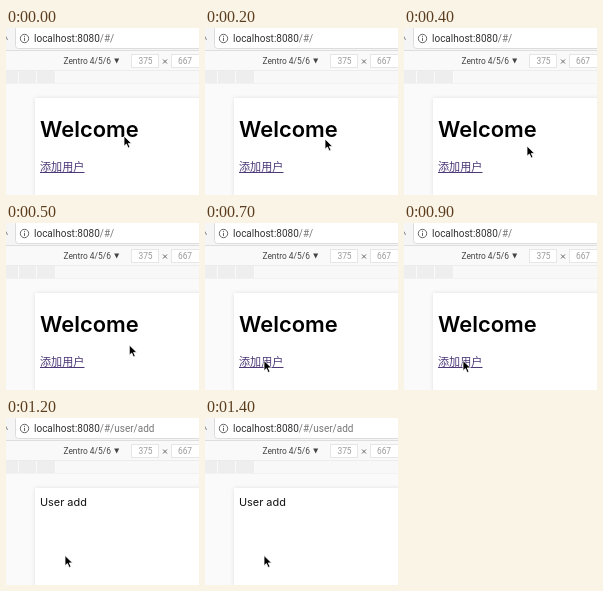
Recreate the animation shown at these times as an HTML page. Size 193 by 167 pixels, loop 1.7 s.

```html
<!DOCTYPE html>
<html lang="en">
<head>
<meta charset="utf-8">
<title>Add user</title>
<style>
  html, body { margin: 0; width: 100%; height: 100%; overflow: hidden; background: #fafafa; }
  svg { display: block; width: 193px; height: 167px; }
  text { white-space: pre; }
  .ui { font-family: Roboto, "Liberation Sans", sans-serif; }
  .url { font-size: 10px; fill: #333; }
  .path { fill: #777; }
  .tool { font-size: 8.4px; fill: #444; }
  .size { font-size: 8.4px; fill: #999; text-anchor: middle; }
  .page { font-family: Inter, "Noto Sans CJK SC", "Noto Sans CJK", sans-serif; font-size: 10.9px; fill: #111; }
  .title { font-size: 21.9px; font-weight: 600; fill: #000; }
  .link { font-family: "Noto Sans CJK SC", "Noto Sans CJK", sans-serif; font-size: 11.1px; fill: #4d3878; }
</style>
</head>
<body>
<svg viewBox="0 0 193 167">
  <defs>
    <filter id="shadow" x="-10%" y="-10%" width="120%" height="120%">
      <feGaussianBlur stdDeviation="2"/>
    </filter>
  </defs>

  <!-- address bar -->
  <rect width="193" height="22" fill="#f5f5f5"/>
  <rect x="9.5" y="-2.5" width="200" height="23" rx="3" fill="#fff" stroke="#dcdcdc"/>
  <path d="M0 8.5L1.5 12" fill="none" stroke="#888"/>
  <g fill="none" stroke="#666">
    <circle cx="18.5" cy="10.5" r="4.2"/>
    <path d="M18.5 9.8V13M18.5 7.8V8.9"/>
  </g>
  <text class="ui url" x="28" y="14">localhost:8080<tspan class="path" id="path">/#/</tspan></text>

  <!-- device toolbar -->
  <rect y="22" width="193" height="21" fill="#f9f9f9"/>
  <path d="M0 22.5H193" stroke="#dedede"/>
  <path d="M0 42.5H193" stroke="#ececec"/>
  <text class="ui tool" x="57.5" y="36">Zentro 4/5/6</text>
  <path d="M108.2 30.5H113.2L110.7 35.5Z" fill="#444"/>
  <g fill="#fff" stroke="#e6e6e6">
    <rect x="125.5" y="26.5" width="27" height="13"/>
    <rect x="165.5" y="26.5" width="28" height="13"/>
  </g>
  <text class="ui size" x="139.5" y="36">375</text>
  <text class="ui size" x="179" y="36">667</text>
  <path d="M157 31.5L161 35.5M161 31.5L157 35.5" stroke="#666" fill="none"/>

  <!-- width presets -->
  <rect y="43" width="193" height="12" fill="#f8f8f8"/>
  <rect y="43" width="49" height="12" fill="#eee"/>
  <path d="M12.5 43V55M30.5 43V55M49.5 43V55" stroke="#fafafa"/>
  <path d="M0 55.5H193" stroke="#f2f2f2"/>

  <!-- page -->
  <rect x="29" y="70" width="190" height="120" fill="#000" opacity=".1" filter="url(#shadow)"/>
  <rect x="29" y="70" width="164" height="97" fill="#fff"/>
  <g id="home">
    <text class="page title" x="34" y="108.5">Welcome</text>
    <text class="link" x="34" y="143">添加用户</text>
    <path d="M34 144.5H78.5" stroke="#4d3878"/>
  </g>
  <text class="page" id="add" x="34" y="88">User add</text>

  <circle id="ring" cx="59.3" cy="138.8" r="14" fill="none" stroke="#000" stroke-width="2"/>
  <path id="cursor" d="M0 0V10.2L2.4 8L4.2 12L6 11.2L4.3 7.4H7.6Z" fill="#000" stroke="#fff" stroke-width=".8" stroke-linejoin="round"/>
</svg>
<script>
  const LOOP = 1700, CLICK = 1100, OPEN = 1200;
  // start time, pointer x, pointer y
  const POINTER = [
    [0, 118, 108], [100, 119, 109], [200, 120, 111], [300, 122, 113.5],
    [400, 123, 118], [500, 123.3, 122], [600, 119, 126], [700, 59, 137.5]
  ];
  const el = id => document.getElementById(id);
  const [home, add, ring, cursor, path] = ["home", "add", "ring", "cursor", "path"].map(el);
  const show = (node, on) => node.setAttribute("visibility", on ? "visible" : "hidden");

  function draw(t) {
    const [, x, y] = POINTER.filter(step => step[0] <= t).pop();
    const opened = t >= OPEN;
    cursor.setAttribute("transform", `translate(${x} ${y})`);
    show(home, !opened);
    show(add, opened);
    show(ring, t >= CLICK && !opened);
    path.textContent = opened ? "/#/user/add" : "/#/";
  }

  const start = performance.now();
  function tick() {
    draw((performance.now() - start) % LOOP);
    requestAnimationFrame(tick);
  }
  tick();
</script>
</body>
</html>
```
